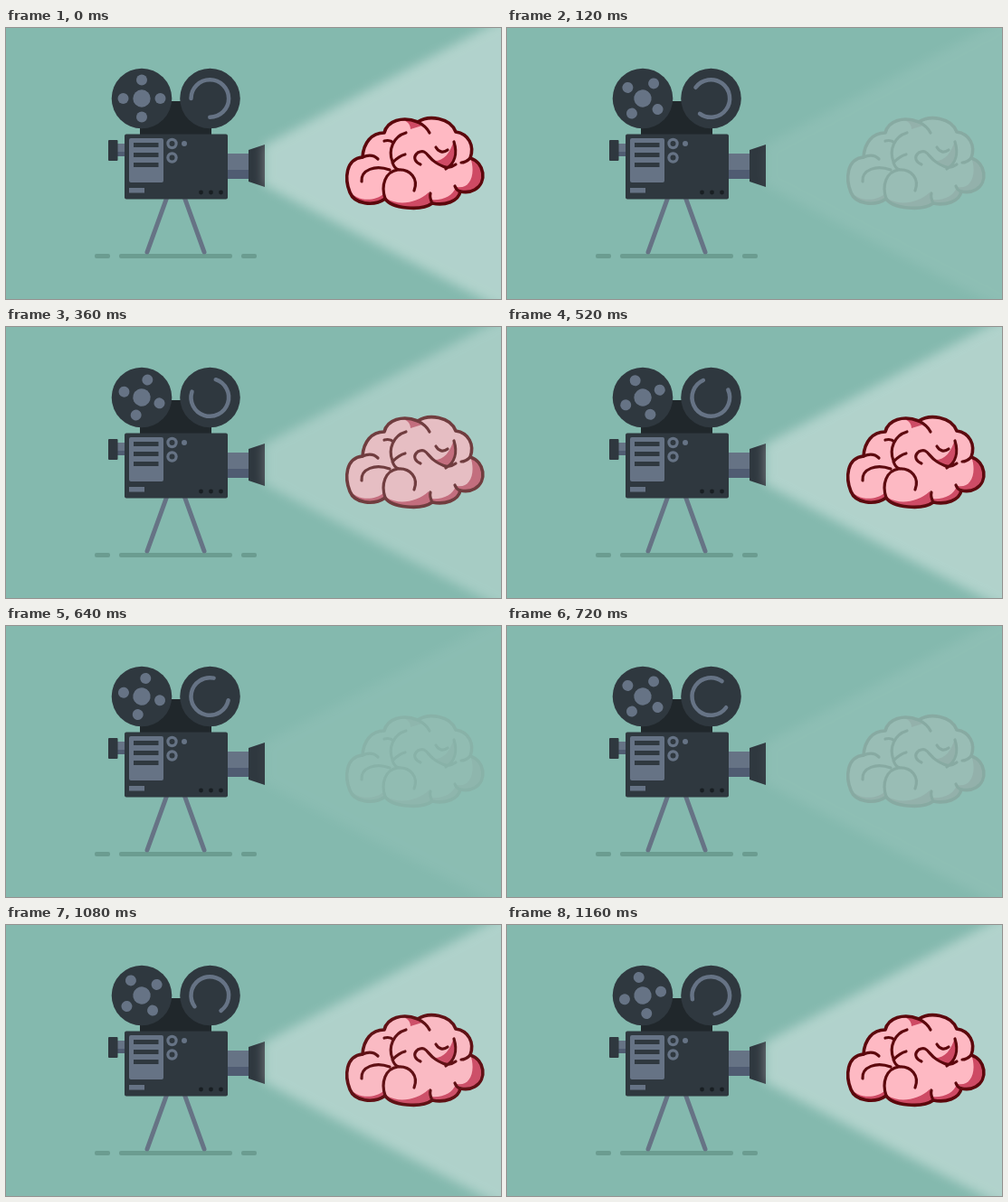
An HTML page with a canvas that plays this animation: 547x300 px, repeating every 1.2 s.

```html
<!DOCTYPE html>
<html lang="en">
<head>
<meta charset="utf-8">
<title>Projector</title>
<style>
  html, body { margin: 0; width: 100%; height: 100%; overflow: hidden; background: #84b9ae; }
  canvas { display: block; }
</style>
</head>
<body>
<canvas id="stage" width="547" height="300"></canvas>
<script>
const W = 547, H = 300, LOOP = 1200, STEP = 40, FADE = 600;
const BG = '#84b9ae', DARK = '#2f383f', DEEP = '#20272b', STEEL = '#667385';
const ctx = document.getElementById('stage').getContext('2d');

function layer(paint) {
  const c = document.createElement('canvas');
  c.width = W;
  c.height = H;
  paint(c.getContext('2d'));
  return c;
}

function rect(g, color, x, y, w, h, r = 0) {
  g.fillStyle = color;
  g.beginPath();
  g.roundRect(x, y, w, h, r);
  g.fill();
}

function disc(g, color, x, y, r) {
  g.fillStyle = color;
  g.beginPath();
  g.arc(x, y, r, 0, Math.PI * 2);
  g.fill();
}

function shape(g, color, d) {
  g.fillStyle = color;
  g.fill(new Path2D(d));
}

function line(g, color, width, d) {
  g.strokeStyle = color;
  g.lineWidth = width;
  g.stroke(new Path2D(d));
}

const camera = layer(g => {
  g.fillStyle = BG;
  g.fillRect(0, 0, W, H);
  for (const [x, w] of [[98, 17], [125, 125], [260, 17]]) rect(g, '#6b9c90', x, 250, w, 5, 2);

  g.lineCap = 'round';
  line(g, STEEL, 5, 'M178 187L156 248M197 187L219 248');

  shape(g, DEEP, 'M148 119V100L180 81H196L227 100V119Z');
  disc(g, DARK, 150, 78, 33.3);
  disc(g, DARK, 225.5, 78, 33.3);

  rect(g, STEEL, 122, 128, 10, 14);
  rect(g, '#505c72', 122, 137, 10, 5);
  rect(g, DARK, 113, 124, 10.5, 23, 1);
  rect(g, STEEL, 244, 139, 25, 28);
  rect(g, '#505c72', 244, 157, 25, 10);
  shape(g, DARK, 'M268 135L286 129V176L268 170Z');

  rect(g, DARK, 131, 117.5, 114, 72, 2);
  rect(g, STEEL, 136, 122, 38, 49, 2);
  for (const y of [127, 138, 149]) rect(g, DARK, 141, y, 27.5, 5);
  rect(g, STEEL, 136, 177, 17, 5.5);
  for (const y of [128, 143.5]) {
    disc(g, STEEL, 183.5, y, 6.2);
    disc(g, DARK, 183.5, y, 3);
  }
  disc(g, STEEL, 197, 128, 3);
  for (const x of [215.5, 226.5, 237.5]) disc(g, '#191f23', x, 182, 2.4);
});

const beam = layer(g => {
  g.filter = 'blur(6px)';
  shape(g, '#fff', 'M285 130L590 -32V333L285 174Z');
});

const brain = layer(g => {
  const outline = 'M394 143C395 127 404 116 418 116C421 103 438 97 455 104' +
    'C467 96 491 99 497 115C511 117 518 130 513 144C529 149 532 171 518 179' +
    'C513 182 507 182 502 181C500 192 485 197 471 194C459 203 426 200 419 189' +
    'C406 198 385 195 380 182C374 167 375 145 394 143Z';
  g.lineCap = g.lineJoin = 'round';
  g.save();
  g.clip(new Path2D(outline));
  shape(g, '#ffb9c3', outline);
  const shade = '#cf4a64';
  shape(g, shade, 'M432 97L456 101L460 108L447 112C447 105 441 101 432 102Z');
  shape(g, shade, 'M495 124C499 137 497 149 485 156C479 153 475 150 472 147C483 148 491 139 495 124Z');
  shape(g, shade, 'M513 143L532 150V182L500 184L498 176C512 179 520 163 513 143Z');
  shape(g, shade, 'M502 180L503 198H468L470 190C483 191 494 186 497 176Z');
  shape(g, shade, 'M421 189C434 197 454 194 467 182L472 194L455 204L425 200Z');
  shape(g, shade, 'M378 179C388 193 407 192 417 184L420 191L405 200L380 195Z');
  g.restore();
  line(g, '#5c070c', 3.6, outline);
  line(g, '#5c070c', 3.2,
    'M394 143C401 140 407 141 411 145' +
    'M418 125C422 124 426 125 428 127' +
    'M442 116C428 120 422 135 427 148C428 153 431 156 434 157' +
    'M455 104C461 107 466 112 468 116' +
    'M393 170C392 157 408 151 424 157' +
    'M419 189C414 174 419 159 433 157C447 156 456 167 451 180' +
    'M427 149C432 144 437 141 441 140' +
    'M455 138C465 133 465 143 475 149C483 154 489 157 497 151' +
    'M454 139C449 144 453 149 458 151' +
    'M475 132C478 137 483 139 488 135' +
    'M495 126C499 139 496 150 486 156' +
    'M513 144C510 147 507 149 503 149' +
    'M502 181C499 180 497 178 496 175' +
    'M471 194C469 190 468 187 469 183');
});

function reels(angle) {
  ctx.save();
  ctx.translate(150, 78);
  ctx.rotate(angle);
  disc(ctx, STEEL, 0, 0, 9.7);
  for (let i = 0; i < 4; i++) {
    disc(ctx, STEEL, 20.5, 0, 6);
    ctx.rotate(Math.PI / 2);
  }
  ctx.restore();

  ctx.save();
  ctx.translate(225.3, 78);
  ctx.rotate(angle);
  ctx.strokeStyle = STEEL;
  ctx.lineWidth = 4.5;
  ctx.lineCap = 'round';
  ctx.beginPath();
  ctx.arc(0, 0, 20.8, Math.PI, Math.PI / 2);
  ctx.stroke();
  ctx.restore();
}

function ease(x) {
  const half = y => 0.5 * (2 * y) ** 2.4;
  return x < 0.5 ? half(x) : 1 - half(1 - x);
}

function blend(image, alpha) {
  ctx.globalAlpha = alpha;
  ctx.drawImage(image, 0, 0);
  ctx.globalAlpha = 1;
}

function draw(ms) {
  const t = Math.floor((ms % LOOP) / STEP) * STEP;
  // Each fade ends on the frame that opens the next half of the loop.
  const v = ease((t % FADE || FADE) / FADE);
  ctx.drawImage(camera, 0, 0);
  reels(t / LOOP * Math.PI * 2);
  blend(beam, 0.37 * (0.15 + 0.85 * v));
  blend(brain, 0.05 + 0.95 * v);
}

let start;
function tick(now) {
  start ??= now;
  draw(now - start);
  requestAnimationFrame(tick);
}
draw(0);
requestAnimationFrame(tick);
</script>
</body>
</html>
```
